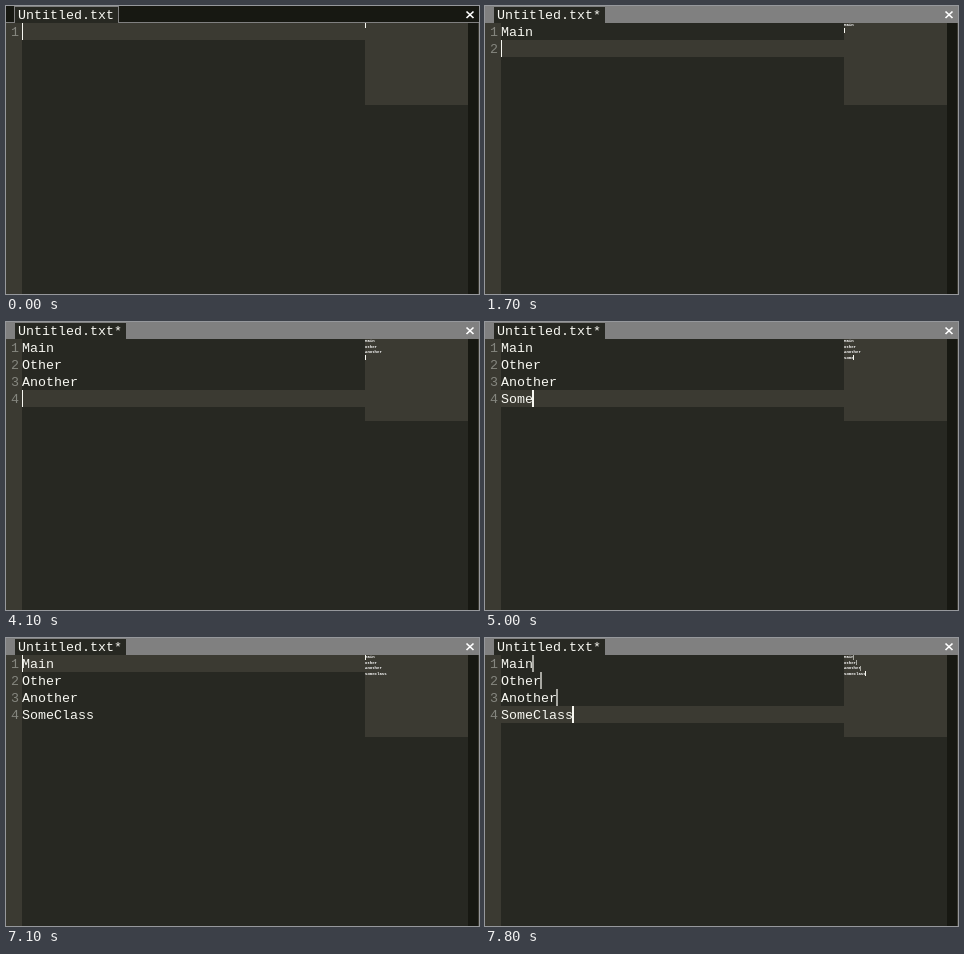
An HTML page for the animation above (8000 ms loop, 473x288 px).

```html
<!DOCTYPE html>
<html lang="en">
<head>
<meta charset="utf-8">
<title>Text editor</title>
<style>
  html, body { margin: 0; width: 100%; height: 100%; overflow: hidden; background: #272822; }
  svg { display: block; width: 473px; height: 288px; }
  rect { shape-rendering: crispEdges; }
  text { font: 13.3333px "Liberation Mono", "Courier New", monospace; fill: #f8f8f2; white-space: pre; }
  .number { fill: #85867f; }
  .mini { font-size: 4px; font-weight: bold; fill: #fff; }
</style>
</head>
<body>
<svg id="stage" viewBox="0 0 473 288"></svg>
<script>
const LOOP = 8000, STEP = 100;
const LEFT = 16, TOP = 17, CHAR = 8, LINE = 17;
const MAP_X = 359, MAP_CHAR = 2.4, MAP_LINE = 5.4;
const DARK = '#171812', PAPER = '#272822', RAISED = '#3b3a32', BAR = '#808080';
const WHITE = '#f8f8f2', SECOND = '#a8a8a2';

// Each run types one character per step from its start time.
const runs = [
  [1100, 'M'], [1300, 'ain'], [1700, '\n'], [2000, 'O'], [2200, 'ther\n'],
  [3000, 'Ano'], [3600, 'ther'], [4100, '\n'], [4700, 'Some'], [5500, 'Cla'], [5900, 'ss']
];
const hidden = [[600, 1000], [4500, 4700], [5400, 5500], [6400, 6600]];

// Carets as [line, column]; the last one is the main caret.
const moves = [
  [6600, [[2, 7]]],
  [6800, [[1, 5]]],
  [6900, [[0, 4]]],
  [7100, [[0, 0]]],
  [7300, [[0, 0], [1, 0]]],
  [7500, [[0, 0], [1, 0], [2, 0]]],
  [7600, [[0, 0], [1, 0], [2, 0], [3, 0]]],
  [7800, [[0, 4], [1, 5], [2, 7], [3, 9]]]
];

const rect = (x, y, w, h, fill) =>
  `<rect x="${x}" y="${y}" width="${w}" height="${h}" fill="${fill}"/>`;
const label = (x, y, value, kind = '') =>
  `<text x="${x}" y="${y}" class="${kind}">${value}</text>`;

function linesAt(time) {
  return runs.map(([start, chars]) =>
    chars.slice(0, Math.max(0, Math.floor((time - start) / STEP) + 1))
  ).join('').split('\n');
}

function caretsAt(time, lines) {
  const move = moves.filter(([start]) => time >= start).pop();
  const last = lines.length - 1;
  return move ? move[1] : [[last, lines[last].length]];
}

function titleBar(time) {
  const focused = time >= 200, dirty = time >= 1100;
  const edge = dirty ? 120 : 112;
  return rect(0, 0, 473, 17, focused ? BAR : DARK) +
    (focused ? '' : rect(0, 16, 473, 1, BAR) + rect(8, 0, edge - 7, 17, BAR)) +
    rect(9, 1, edge - 9, 16, PAPER) +
    label(12, 13, 'Untitled.txt' + (dirty ? '*' : '')) +
    '<path d="M460.5 5.5l7 6.5m0-6.5l-7 6.5" stroke="#fff" stroke-width="1.7"/>';
}

function caret([line, column], color) {
  const x = Math.max(LEFT, LEFT + column * CHAR - 1);
  const right = LEFT + column * CHAR + 1;
  const mapY = Math.round(TOP + line * MAP_LINE);
  return rect(x, TOP + line * LINE, right - x, LINE, color) +
    rect(Math.floor(MAP_X + column * MAP_CHAR), mapY, 1, 5, color);
}

function draw(time) {
  const lines = linesAt(time), carets = caretsAt(time, lines);
  const main = carets[carets.length - 1];
  const visible = !hidden.some(([from, to]) => time >= from && time < to);
  return rect(0, 0, 473, 288, PAPER) +
    rect(0, 17, LEFT, 271, RAISED) +
    rect(MAP_X, 17, 103, 82, RAISED) +
    rect(462, 17, 10, 271, DARK) +
    rect(472, 17, 1, 271, RAISED) +
    rect(LEFT, TOP + main[0] * LINE, MAP_X - LEFT, LINE, RAISED) +
    titleBar(time) +
    lines.map((line, i) =>
      label(5, 30 + i * LINE, i + 1, 'number') +
      label(LEFT, 30 + i * LINE, line) +
      label(MAP_X, 20.4 + i * MAP_LINE, line, 'mini')).join('') +
    (visible ? carets.map(c => caret(c, c === main ? WHITE : SECOND)).join('') : '');
}

const stage = document.getElementById('stage');
const begin = performance.now();
let shown = -1;

function tick() {
  const time = (performance.now() - begin) % LOOP;
  const step = Math.floor(time / STEP);
  if (step !== shown) {
    shown = step;
    stage.innerHTML = draw(step * STEP);
  }
  requestAnimationFrame(tick);
}
tick();
</script>
</body>
</html>
```
